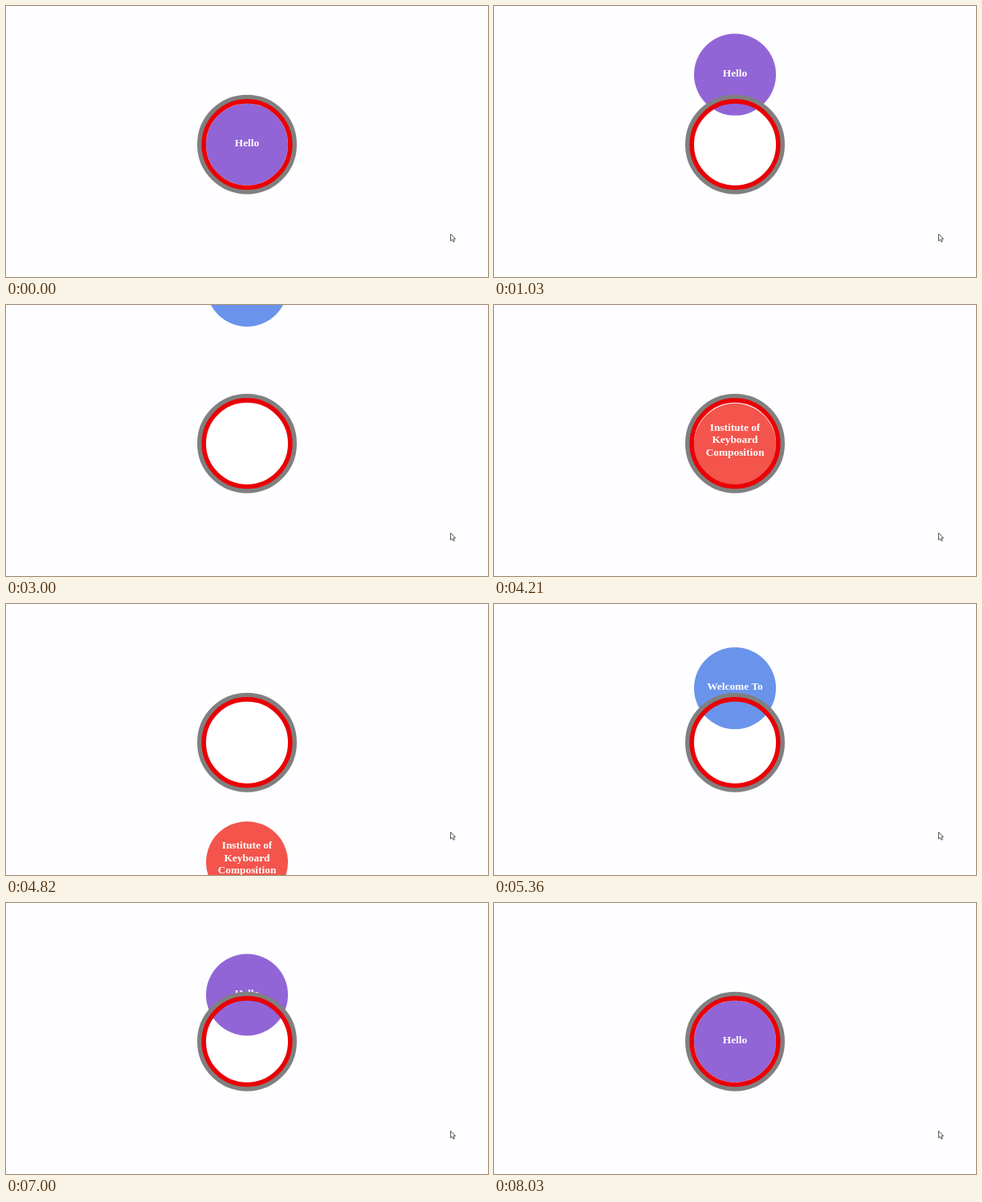
An HTML page with a canvas for the animation above (8.06 s loop, 600 by 338 pixels).

```html
<!DOCTYPE html>
<html lang="en">
<head>
<meta charset="utf-8">
<title>Sliding greeting</title>
<style>
  html, body { margin: 0; width: 100%; height: 100%; overflow: hidden; background: #fefdff; }
  canvas { display: block; }
</style>
</head>
<body>
<canvas id="stage" width="600" height="338"></canvas>
<script>
const ctx = document.getElementById('stage').getContext('2d');
const LOOP = 8060;
const CENTER_X = 300;
const CENTER_Y = 172.7;
const BALL_RADIUS = 51;
const SPACING = 430;
const LINE_HEIGHT = 15.6;

const balls = [
  { color: '#9165d6', lines: ['Hello'], baseline: 2 },
  { color: '#6a94eb', lines: ['Welcome To'], baseline: 1.8 },
  { color: '#f3544c', lines: ['Institute of', 'Keyboard', 'Composition'], baseline: -17.2 }
];

// Each move eases the column of balls to a new offset, then holds.
const moves = [
  { start: 640, end: 1580, to: -123.7 },
  { start: 1745, end: 3490, to: -653.7 },
  { start: 3490, end: 4290, to: -2 * SPACING },
  { start: 4540, end: 5705, to: -SPACING - 45.7 },
  { start: 5705, end: 7905, to: 0 }
];

// Equivalent of the CSS "ease" curve: cubic-bezier(.25, .1, .25, 1).
function ease(x) {
  const bezier = (u, a, b) => 3 * (1 - u) ** 2 * u * a + 3 * (1 - u) * u * u * b + u ** 3;
  let low = 0, high = 1;
  for (let i = 0; i < 24; i++) {
    const mid = (low + high) / 2;
    if (bezier(mid, 0.25, 0.25) < x) low = mid; else high = mid;
  }
  return bezier(low, 0.1, 1);
}

function columnOffset(time) {
  let offset = 0;
  for (const { start, end, to } of moves) {
    if (time < start) break;
    if (time < end) return offset + (to - offset) * ease((time - start) / (end - start));
    offset = to;
  }
  return offset;
}

function disc(y, radius, color) {
  ctx.fillStyle = color;
  ctx.beginPath();
  ctx.arc(CENTER_X, y, radius, 0, Math.PI * 2);
  ctx.fill();
}

function ring(inner, outer, color) {
  ctx.strokeStyle = color;
  ctx.lineWidth = outer - inner;
  ctx.beginPath();
  ctx.arc(CENTER_X, CENTER_Y, (inner + outer) / 2, 0, Math.PI * 2);
  ctx.stroke();
}

function drawBall({ color, lines, baseline }, y) {
  disc(y, BALL_RADIUS, color);
  ctx.fillStyle = '#fff';
  lines.forEach((line, i) => ctx.fillText(line, CENTER_X, y + baseline + i * LINE_HEIGHT));
}

function drawCursor() {
  const arrow = [[0, 0], [0, 8.5], [2, 6.8], [3.4, 9.8], [4.8, 9.2], [3.5, 6.3], [6, 6]];
  ctx.beginPath();
  arrow.forEach(([x, y]) => ctx.lineTo(553.5 + x, 284.5 + y));
  ctx.closePath();
  ctx.fillStyle = '#fff';
  ctx.fill();
  ctx.strokeStyle = '#444';
  ctx.lineWidth = 0.9;
  ctx.stroke();
}

function draw(time) {
  ctx.fillStyle = '#fefdff';
  ctx.fillRect(0, 0, 600, 338);
  disc(CENTER_Y, 54, '#fff');
  ctx.font = 'bold 13.33px "Liberation Serif", "Times New Roman", serif';
  ctx.textAlign = 'center';
  const top = CENTER_Y + columnOffset(time);
  balls.forEach((ball, i) => drawBall(ball, top + i * SPACING));
  ring(56, 62, '#808080');
  ring(BALL_RADIUS, 56.6, '#e90006');
  drawCursor();
}

const began = performance.now();
function tick() {
  draw((performance.now() - began) % LOOP);
  requestAnimationFrame(tick);
}
tick();
</script>
</body>
</html>
```
